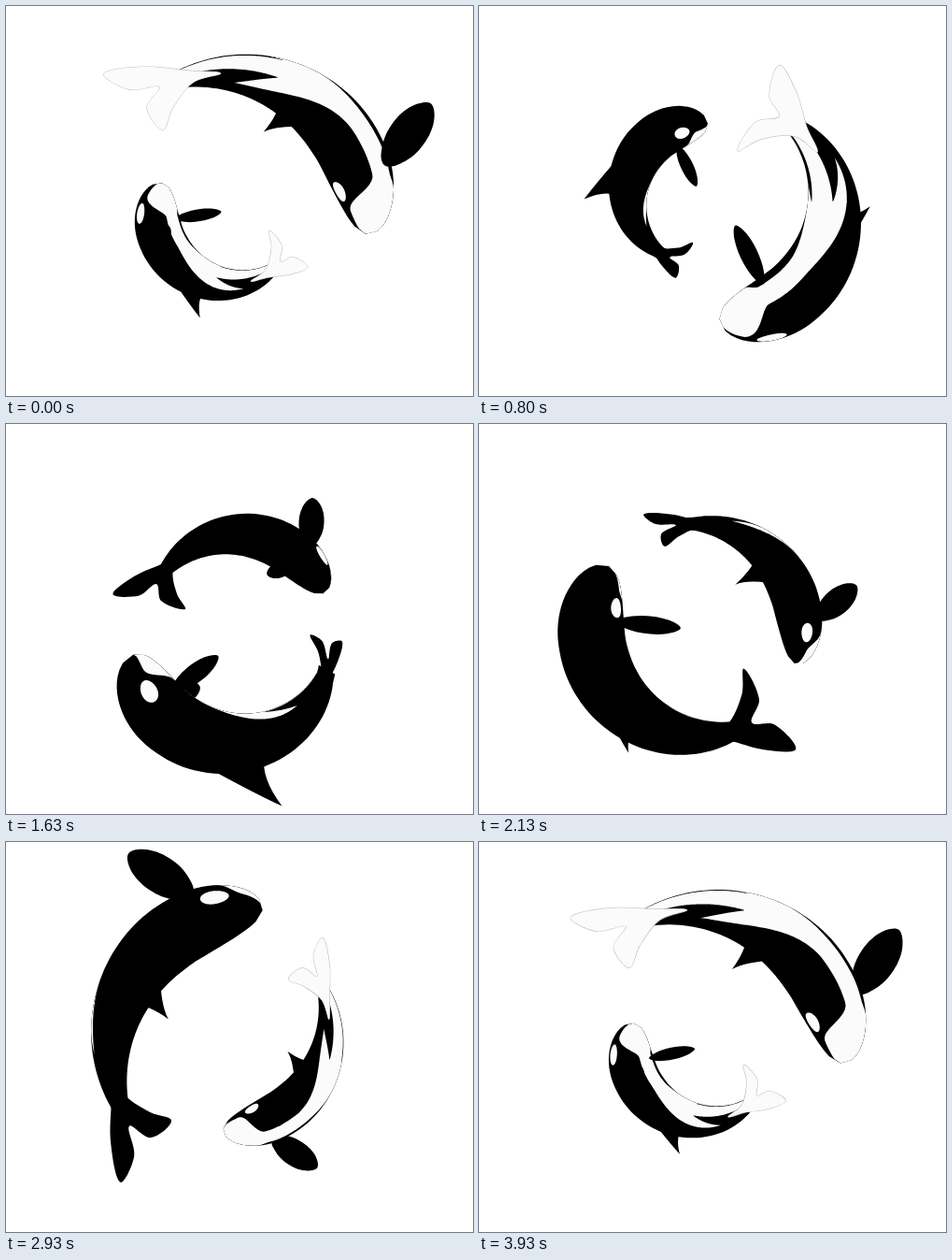
Animation of 500x417 px, one loop 3.97 s. Source, as an HTML page with a canvas:

```html
<!DOCTYPE html>
<html lang="en">
<head>
<meta charset="utf-8">
<title>Circling orcas</title>
<style>
  html, body { margin: 0; width: 100%; height: 100%; overflow: hidden; background: #fff; }
  canvas { display: block; width: 500px; height: 417px; }
</style>
</head>
<body>
<canvas id="stage"></canvas>
<script>
const W = 500, H = 417, CX = 250, CY = 210;
const LOOP = 3970, STEP = LOOP / 119, TAU = Math.PI * 2, DEG = Math.PI / 180;
const BELLY_UP = 470;   // moment at which the belly faces the viewer
const RING = 131;       // radius of the circle the whales swim on
const CALF = 0.7;
const BLACK = '#000', WHITE = '#fbfbfb', EDGE = '#aeb6cc';

const canvas = document.getElementById('stage');
const ctx = canvas.getContext('2d');
const dpr = window.devicePixelRatio || 1;
canvas.width = W * dpr;
canvas.height = H * dpr;

const clamp = (v, lo, hi) => Math.max(lo, Math.min(hi, v));
const wrap = a => a - 360 * Math.round(a / 360);
const sin = a => Math.sin(a * DEG), cos = a => Math.cos(a * DEG);
function ease(a, b, v) {
  const x = clamp((v - a) / (b - a), 0, 1);
  return x * x * (3 - 2 * x);
}

// Along the body, s runs from 0 at the nose to 1 at the tail root.
// Around it, angles are measured in degrees from the middle of the belly.
const arch = s => 12 - 62 * s + 72 * s * s;
function girth(s) {
  const head = 1 - Math.min(s / 0.28, 1);
  const tail = clamp((s - 0.35) / 0.65, 0, 1);
  return (36 - 26 * tail ** 1.6) * Math.sqrt(1 - head * head);
}
const bellyHalf = s => 21 + 66 * (1 - ease(0.07, 0.2, s)) + 50 * ease(0.36, 0.8, s);

// Point beside the spine; a positive offset leads towards the ring's centre
function spot(roll, s, offset) {
  const a = 14 - 129 * s, r = RING - arch(s) * sin(roll) - offset;
  return [r * cos(a), r * sin(a)];
}

function polygon(points) {
  const path = new Path2D();
  points.forEach(p => path.lineTo(...p));
  path.closePath();
  return path;
}

// Band on the skin from s0 to s1; what lies on the far side folds onto the outline
function band(roll, s0, s1, centre, half) {
  const near = [], far = [], n = 60;
  for (let i = 0; i <= n; i++) {
    const s = s0 + (s1 - s0) * i / n, mid = wrap(roll + centre(s)), h = half(s);
    const at = a => spot(roll, s, girth(s) * sin(clamp(a, -90, 90)));
    near.push(at(mid + h));
    far.unshift(at(mid - h));
  }
  return polygon(near.concat(far));
}

// Closed smooth curve; sharp turns stay sharp
function curve(pts) {
  const n = pts.length, path = new Path2D();
  const pt = i => pts[(i + n) % n];
  const dist = (a, b) => Math.hypot(a[0] - b[0], a[1] - b[1]) + 1e-6;
  const handle = (prev, at, next, len) => {
    const k = 0.36 * len / (dist(prev, at) + dist(at, next));
    return [at[0] + (next[0] - prev[0]) * k, at[1] + (next[1] - prev[1]) * k];
  };
  path.moveTo(...pts[0]);
  for (let i = 0; i < n; i++) {
    const a = pt(i), b = pt(i + 1), len = dist(a, b);
    path.bezierCurveTo(...handle(pt(i - 1), a, b, len), ...handle(pt(i + 2), b, a, len), ...b);
  }
  path.closePath();
  return path;
}

function fill(path, color) {
  ctx.fillStyle = color;
  ctx.fill(path);
}

function flipper(roll, side) {
  const out = sin(roll + side * 45);
  const [x, y] = spot(roll, 0.22, 28 * out);
  const [tx, ty] = spot(roll, 0.32, 100 * out);
  const dx = tx - x, dy = ty - y, len = Math.hypot(dx, dy);
  const w = 30 - 11 * out;
  const half = [[0, 0], [0.1, 0.26], [0.42, 0.48], [0.8, 0.38], [1, 0]];
  const back = half.slice(1, -1).reverse().map(([f, k]) => [f, -k]);
  fill(curve(half.concat(back).map(([f, k]) =>
    [x + dx * f - dy / len * k * w, y + dy * f + dx / len * k * w])), BLACK);
}

function dorsal(roll) {
  const out = -sin(roll);
  const at = (s, height) => spot(roll, s, height * out);
  const path = new Path2D();
  path.moveTo(...at(0.64, 20));
  path.quadraticCurveTo(...at(0.62, 42), ...at(0.66, 78));
  path.quadraticCurveTo(...at(0.6, 58), ...at(0.48, 32));
  path.closePath();
  fill(path, BLACK);
}

function flukes(roll) {
  const spread = Math.hypot(cos(roll), 0.14);
  const lobe = [[0.97, 9], [1.08, 36], [1.167, 58], [1.15, 18]];
  const other = lobe.map(([s, l]) => [s, -l]).reverse();
  const shape = curve([...lobe, [1.075, 0], ...other, [0.87, 0]]
    .map(([s, l]) => spot(roll, s, l * spread)));
  const underside = cos(roll) > 0.06;
  ctx.strokeStyle = EDGE;
  if (underside) ctx.stroke(shape);
  fill(shape, underside ? WHITE : BLACK);
}

function markings(roll) {
  const paint = (...args) => fill(band(roll, ...args), WHITE);
  paint(0, 0.675, () => 0, bellyHalf);
  paint(0.67, 1, () => 0, () => 28);
  for (const side of [-1, 1]) {
    const inner = s => 28 + 44 * (s - 0.67) / 0.16;
    paint(0.67, 0.83, s => side * (inner(s) + bellyHalf(s)) / 2,
      s => Math.max(0, bellyHalf(s) - inner(s)) / 2);
    paint(0.112, 0.202, () => side * 98,
      s => 16 * Math.sqrt(Math.max(0, 1 - ((s - 0.157) / 0.045) ** 2)));
  }
}

function whale(time, lead, turn, size) {
  const roll = wrap(360 * (time + lead - BELLY_UP) / LOOP);
  const limbs = front => {
    if (cos(roll) < 0 === front) dorsal(roll);
    for (const side of [-1, 1])
      if (cos(roll + side * 45) > 0 === front) flipper(roll, side);
  };

  ctx.save();
  ctx.translate(CX, CY);
  ctx.rotate(TAU * time / LOOP + turn);
  ctx.scale(size, size);
  ctx.lineWidth = 1 / size;

  limbs(false);
  const body = band(roll, 0, 1.03, () => -roll, () => 90);
  fill(body, BLACK);
  ctx.save();
  ctx.clip(body);
  markings(roll);
  ctx.restore();
  flukes(roll);
  limbs(true);
  ctx.restore();
}

function draw() {
  const time = Math.floor((performance.now() % LOOP + 8) / STEP) * STEP;
  ctx.setTransform(dpr, 0, 0, dpr, 0, 0);
  ctx.fillStyle = '#fff';
  ctx.fillRect(0, 0, W, H);
  whale(time, 0, 0, 1);
  whale(time, LOOP / 4, Math.PI, CALF);   // the calf rolls a quarter loop ahead
  requestAnimationFrame(draw);
}
draw();
</script>
</body>
</html>
```
